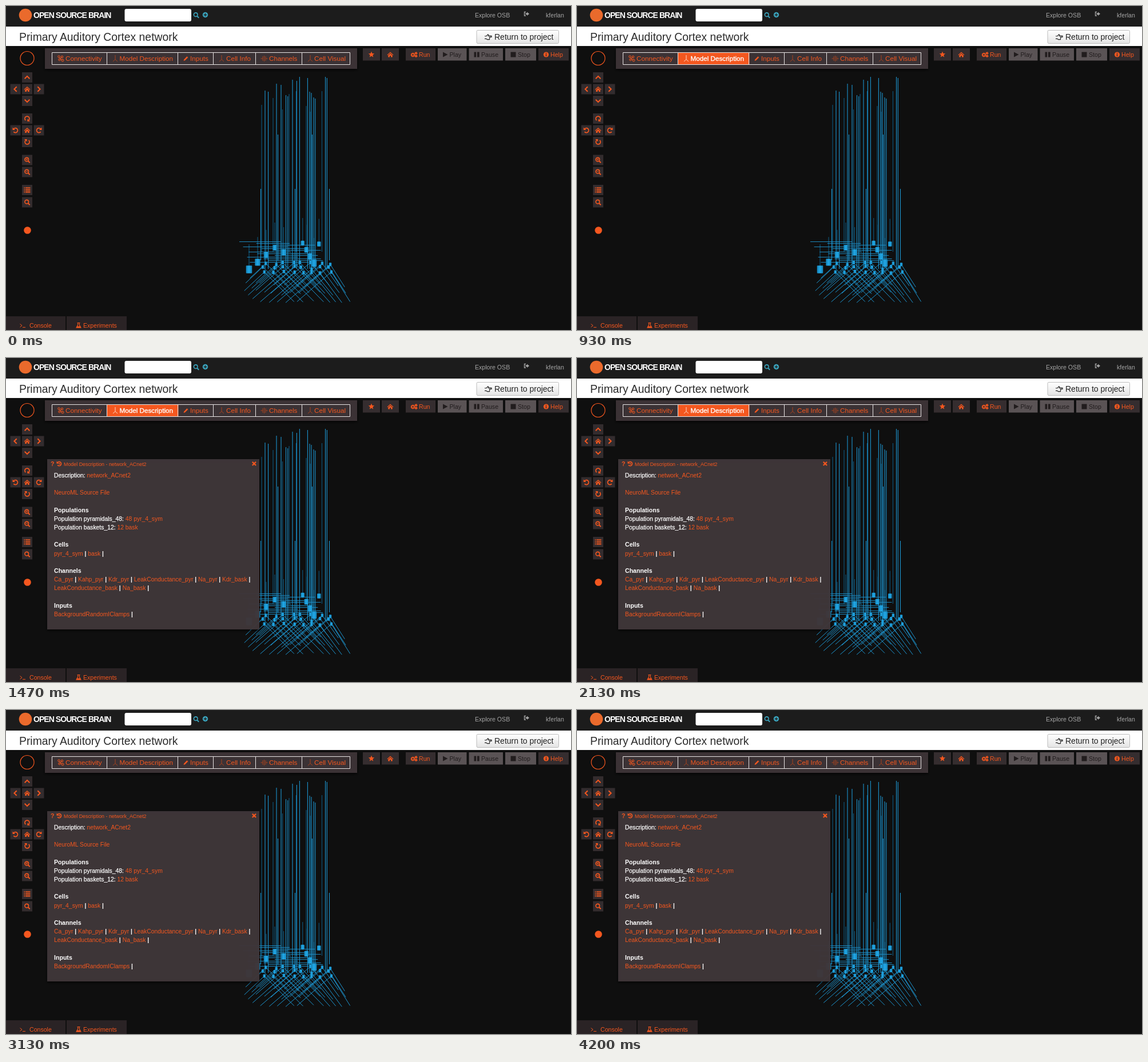
Animation of 988x567 px, one loop 4.27 s. Source, as an HTML page:

```html
<!DOCTYPE html>
<html lang="en">
<head>
<meta charset="utf-8">
<title>Primary Auditory Cortex network</title>
<style>
html, body { margin: 0; width: 100%; height: 100%; overflow: hidden; background: #0f0f0f; }
svg { display: block; font-family: "Liberation Sans", Arial, sans-serif; }
text { white-space: pre; }
.o { fill: #f4571f; }
.w { fill: #fff; }
.b { font-weight: bold; fill: #fff; }
</style>
</head>
<body>
<svg id="stage" width="988" height="567" viewBox="0 0 988 567">
<defs>
<linearGradient id="btn" x2="0" y2="1"><stop stop-color="#fff"/><stop offset="1" stop-color="#e4e4e4"/></linearGradient>
<linearGradient id="cyl"><stop stop-color="#1583b8"/><stop offset=".5" stop-color="#22a9e8"/><stop offset="1" stop-color="#1583b8"/></linearGradient>
<filter id="shade" x="-10%" y="-20%" width="120%" height="150%"><feDropShadow dx="0" dy="2" stdDeviation="2" flood-color="#000" flood-opacity=".8"/></filter>
</defs>
</svg>
<script>
const ORANGE = '#f4571f', BLUE = '#1d94ce', DIM = '#0e5275', DARK = '#352d2f';
const stage = document.getElementById('stage');

const rect = (x, y, w, h, fill, more = '') =>
  `<rect x="${x}" y="${y}" width="${w}" height="${h}" fill="${fill}" ${more}/>`;
const text = (x, y, size, s, more = 'class="o"') =>
  `<text x="${x}" y="${y}" font-size="${size}" ${more}>${s}</text>`;
const line = (d, color = ORANGE, w = 1.2) =>
  `<path d="${d}" fill="none" stroke="${color}" stroke-width="${w}"/>`;
const solid = (d, color = ORANGE) => `<path d="${d}" fill="${color}"/>`;
const disc = (x, y, r, color = ORANGE) => `<circle cx="${x}" cy="${y}" r="${r}" fill="${color}"/>`;
const ring = (x, y, r, color = ORANGE, w = 1.4) =>
  `<circle cx="${x}" cy="${y}" r="${r}" fill="none" stroke="${color}" stroke-width="${w}"/>`;
const at = (x, y, s, more = '') => `<g transform="translate(${x} ${y}) ${more}">${s}</g>`;
const loop = (n, f) => Array.from({ length: n }, (_, i) => f(i)).join('');

// icons, centred on the origin
const home = solid('M-5.5 .5L0 -4.5 5.5 .5 4.6 1.3 0 -2.8 -4.6 1.3ZM-3.7 1.5L0 -1.8 3.7 1.5V4.5H1V2H-1V4.5H-3.7Z');
const star = solid('M' + loop(10, i => {
  const a = i * Math.PI / 5, r = i % 2 ? 2.4 : 5.5;
  return `${(r * Math.sin(a)).toFixed(1)} ${(-r * Math.cos(a)).toFixed(1)} `;
}) + 'Z');
const turn = line('M-3 -2.6A4 4 0 1 1 -3.2 2.6', ORANGE, 1.7) + solid('M-5 -5V-.4H-.4Z');
const chevron = line('M-4.3 2.2L0 -2.1 4.3 2.2', ORANGE, 2);
const lens = (color = ORANGE) => ring(-.8, -.8, 3.3, color, 1.6) + line('M1.6 1.6L4.7 4.7', color, 2);
const list = line(loop(4, i => `M-5.5 ${i * 2.7 - 4}h1.5m1 0h8.5`), ORANGE, 1.5);
const cell = color => line('M0 -6V1.5L-4 5M0 1.5L4 5', color, 1);
const gear = (x, y, r) => ring(x, y, r, ORANGE, 1.8) +
  `<circle cx="${x}" cy="${y}" r="${r + 1.2}" fill="none" stroke="${ORANGE}" stroke-width="1" stroke-dasharray="1.2 1.2"/>`;

let seed = 7;
const random = () => (seed = seed * 16807 % 2147483647) / 2147483647;

const tube = (x, y, w, h) => rect(x - w / 2, y - h / 2, w, h, 'url(#cyl)', 'rx="1"');

function neurons() {
  // pairs of tall dendrites: x, top, gap
  const pairs = [
    [453, 148, 5.6], [473, 136, 8], [489.5, 156, 3.2], [501, 129, 7.4],
    [513.4, 124, 14], [531, 150, 3], [538, 160, 2.8], [558.5, 124, 2.8]];
  let faint = '', stems = '', sides = '', basal = '', bodies = '';
  for (const [x, top, gap] of pairs) {
    faint += `M${x - 6} ${top + 25}V430`;
    stems += `M${x} ${top}V460M${x + gap} ${top + 2}V460`;
  }
  for (let i = 0; i < 5; i++) stems += `M${445.5 + i * 30} ${i % 2 ? 225 : 320}V445`;

  for (let i = 0; i < 13; i++) {
    const a = 408 + random() * 20 + i % 3 * 24;
    sides += `M${a} ${412.5 + i * 3}H${Math.min(566, a + 50 + i * 3 + random() * 25)}`;
  }

  // a grid of small cells, each with two slanted dendrites
  for (let row = 0; row < 3; row++) for (let col = 0; col < 8; col++) {
    const x = 453 + col * 16 + (random() - .5) * 9;
    const y = 450 + row * 8 + (random() - .5) * 6;
    const k = Math.min(1, Math.max(0, (x - 450) / 45)), size = .76 + row * .12;
    const left = (34 + 26 * k) * size, right = (52 - Math.max(0, x - 500) * .28) * size;
    basal += `M${x - left} ${y + (32 + 20 * k) * size}L${x} ${y}l${right} ${52 * size}`;
    bodies += tube(x, y, 4.5, 6);
  }

  // rows of large cells receding from one end to the other: x, y, x, y, count
  for (const [x0, y0, x1, y1, n] of [[425, 461, 470, 423, 4], [538.5, 450, 518.7, 415, 4], [485.5, 431, 547.3, 416.5, 2]])
    for (let i = 0; i < n; i++) {
      const u = i / (n - 1), x = x0 + (x1 - x0) * u, y = y0 + (y1 - y0) * u, w = (y - 340) / 11.5;
      faint += `M${x} ${y - 44}V${y}`;
      bodies += tube(x, y, w, w * 1.3);
    }
  return line(faint, DIM, 1.2) + line(stems, BLUE, 1.1) + line(sides, BLUE, .9) + line(basal, BLUE, 1) + bodies;
}

function header() {
  const hand = line('M-6 -1.2H-3L-.5 -4.2 1 -3.4 .2 -1.6H6V.4H1.6M-6 3.4H-3L-1.6 4.6H2.4L3 .6', '#222', 1.1);
  return rect(0, 0, 988, 36, '#1c1c1c') + rect(0, 36, 988, 34, '#fff') +
    disc(34, 16, 11.3, '#ea6a2c') +
    text(48, 21, 14, 'OPEN SOURCE BRAIN', 'class="b" letter-spacing="-.95"') +
    rect(207.5, 5, 116.5, 22, '#fff', 'rx="3"') +
    at(332.5, 16, lens('#3aa5be')) +
    disc(348.5, 15.5, 4.7, '#3aa5be') + line('M345.7 15.5h5.6M348.5 12.7v5.6', '#222', 1.4) +
    text(820, 20, 10.6, 'Explore OSB', 'fill="#a5a5a5"') +
    line('M909 10.5H906.5V17H909', '#a5a5a5', 1.3) + solid('M908.5 12.6H911V10.5L915 13.8 911 17V15H908.5Z', '#a5a5a5') +
    text(944, 20, 10.6, 'kferlan', 'fill="#a5a5a5"') +
    text(23, 61, 19.35, 'Primary Auditory Cortex network', 'fill="#2c2c2c"') +
    rect(823, 42.5, 143.5, 23, 'url(#btn)', 'stroke="#bbb" rx="2"') +
    at(843, 54, hand) + text(854, 59, 14, 'Return to project', 'fill="#222"');
}

function toolbar() {
  const tone = '#a8431f';
  const pencil = solid('M-4 4L-3.2 1.4 2 -3.8 3.8 -2 -1.4 3.2Z');
  const net = ring(-3, -3.5, 1.8, ORANGE, 1) + ring(2.5, -3, 1.8, ORANGE, 1) +
    ring(-2, 2, 1.8, ORANGE, 1) + ring(3.5, 3, 2, ORANGE, 1) + line('M-3 -3L3 3M2 -3L-2 2', ORANGE, 1);
  const pore = line('M-6 0H-2.5M2.5 0H6M-2.5 -4V4M2.5 -4V4M0 -5V5', tone, 1);
  const label = (x, s) => text(x, 96.3, 11.7, s);
  return rect(68, 74, 546, 36, '#3a3234', 'filter="url(#shade)"') +
    rect(177, 81.5, 124.5, 21.5, ORANGE, 'id="lit"') +
    line('M80.5 81.5H601.5V102.5H80.5Z' + [177, 301, 363, 437, 518].map(x => `M${x - .5} 81.5v21`).join(''), '#e8e4e4', 1) +
    at(95.5, 92, net) + label(104, 'Connectivity') +
    `<g id="plain">${at(191, 92, cell(tone))}${label(198.5, 'Model Description')}</g>` +
    `<g id="bright">${at(191, 92, cell('#ffd9c8'))}${text(198.5, 96.3, 11.7, 'Model Description', 'class="w" stroke="#fff" stroke-width=".35"')}</g>` +
    at(314.5, 92, pencil) + label(322, 'Inputs') +
    at(377, 92, cell(tone)) + label(385, 'Cell Info') +
    at(451.5, 92, pore) + label(460, 'Channels') +
    at(532, 92, cell(tone)) + label(539, 'Cell Visual');
}

function controls() {
  const off = '#5a5355', ink = '#211c1d';
  const key = (x, w, fill = DARK) => rect(x, 74, w, 21.5, fill);
  const label = (x, s, c = ORANGE) => text(x, 88.6, 10.6, s, `fill="${c}"`);
  return key(624, 30) + at(639, 85, star) + key(657, 30) + at(672, 85, home) +
    key(699, 52) + gear(711.5, 85.5, 2.3) + gear(717, 82.6, 1) + gear(717, 87.6, 1) + label(722, 'Run') +
    key(755, 50.5, off) + solid('M764 80.5L772.5 85 764 89.5Z', ink) + label(775.5, 'Play', ink) +
    key(809.5, 59.5, off) + solid('M818.5 80.5h3.7v9h-3.7zM824 80.5h3.7v9H824z', ink) + label(831, 'Pause', ink) +
    key(873, 54, off) + rect(882.5, 80.5, 9, 9, ink) + label(895, 'Stop', ink) +
    key(931, 53) + disc(944.5, 85, 4.6) + line('M944.5 82V83.4M944.5 84.3V88', DARK, 1.5) + label(952, 'Help');
}

function sidebar() {
  const key = (x, y, icon, more) => rect(x - 9, y - 9, 18, 18, '#332c2e') + at(x, y, icon, more);
  const pad = (y, up, down, left, right) =>
    key(37, y - 20.5, ...up) + key(37, y + 20.5, ...down) +
    key(16.5, y, ...left) + key(57.5, y, ...right) + key(37, y, home);
  const minus = line('M-2.6 -.8H1', ORANGE, 1), plus = minus + line('M-.8 -2.6V1', ORANGE, 1);
  return ring(37, 91.5, 12, ORANGE, 1.2) +
    pad(145.5, [chevron], [chevron, 'rotate(180)'], [chevron, 'rotate(-90)'], [chevron, 'rotate(90)']) +
    pad(217.5, [turn, 'scale(-1 1) rotate(-90)'], [turn, 'scale(-1 1) rotate(90)'], [turn], [turn, 'scale(-1 1)']) +
    key(37, 269.5, lens() + plus) + key(37, 290.5, lens() + minus) +
    key(37, 322, list) + key(37, 343.5, lens()) +
    disc(37.5, 392.5, 6.3);
}

function tabs() {
  const flask = line('M-2.5 -4.5H2.5M-1.3 -4.5V-1L-4 4H4L1.3 -1V-4.5', ORANGE, 1.1) + solid('M-2.5 1.5H2.5L4 4H-4Z');
  return rect(0, 543, 104, 24, '#2a2325') + rect(106, 543, 105, 24, '#2a2325') +
    line('M24.5 556.5L28 559.3 24.5 562M29 562.3H34', ORANGE, 1) + text(41, 562.5, 10.6, 'Console') +
    at(127, 559, flask) + text(135, 562.5, 10.6, 'Experiments');
}

function panel() {
  const bar = '<tspan class="b"> | </tspan>';
  const links = (...names) => names.map(n => n + bar).join('');
  const title = s => `<tspan class="b" font-size="10.6">${s}</tspan>`;
  const pair = (a, b) => `<tspan fill="#fff" stroke="#fff" stroke-width=".25">${a}: </tspan>${b}`;
  const rows = [
    pair('Description', 'network_ACnet2'), '',
    'NeuroML Source File', '',
    title('Populations'),
    pair('Population pyramidals_48', '48 pyr_4_sym'),
    pair('Population baskets_12', '12 bask'), '',
    title('Cells'),
    links('pyr_4_sym', 'bask'), '',
    title('Channels'),
    links('Ca_pyr', 'Kahp_pyr', 'Kdr_pyr', 'LeakConductance_pyr', 'Na_pyr', 'Kdr_bask'),
    links('LeakConductance_bask', 'Na_bask'), '',
    title('Inputs'),
    links('BackgroundRandomIClamps')];
  return '<g id="panel">' +
    rect(72, 177, 371, 298, 'rgb(64,56,58)', 'fill-opacity=".91" filter="url(#shade)"') +
    text(78, 188.6, 10.5, '?', 'class="o" font-weight="bold"') +
    at(93, 185, turn + line('M.2 -2V.6H2', ORANGE, 1.3), 'scale(.9)') +
    text(101, 188.5, 8.9, 'Model Description - network_ACnet2') +
    line('M430.8 181.8L437 188M437 181.8L430.8 188', ORANGE, 2.3) +
    rows.map((s, i) => text(84, 209 + i * 15.17, 10.35, s)).join('') + '</g>';
}

stage.innerHTML += neurons() + header() + toolbar() + controls() + sidebar() + tabs() + panel();

const show = (id, on) =>
  document.getElementById(id).setAttribute('visibility', on ? 'visible' : 'hidden');

function draw() {
  const t = performance.now() % 4270;
  const hover = t >= 330 && t < 2670;
  show('lit', hover);
  show('bright', hover);
  show('plain', !hover);
  show('panel', t >= 1000);
  requestAnimationFrame(draw);
}
draw();
</script>
</body>
</html>
```
